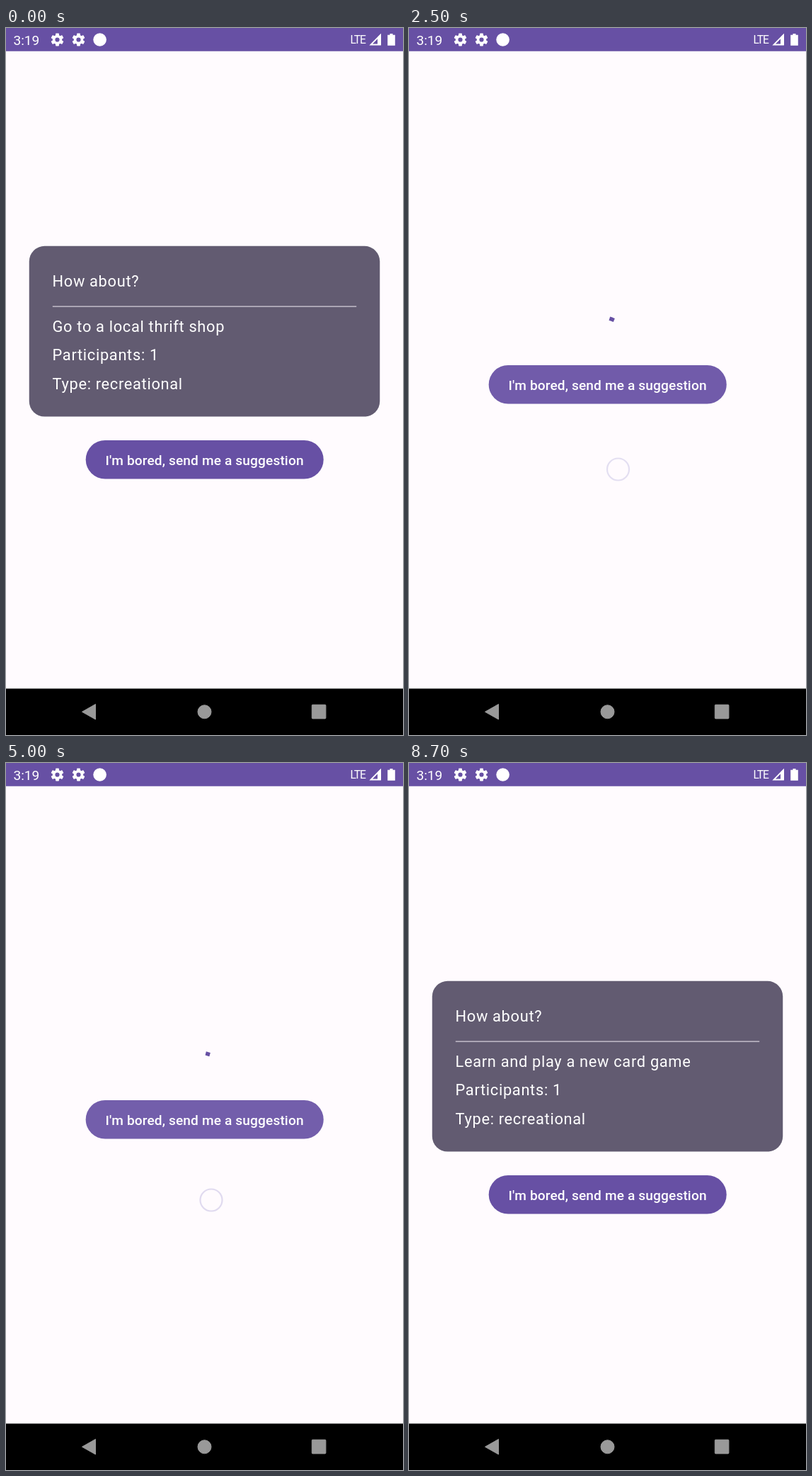
Recreate the animation shown at these times as an HTML page. Size 561x998 px, loop 8800 ms.

```html
<!DOCTYPE html>
<html lang="en">
<head>
<meta charset="utf-8">
<title>Suggestion app</title>
<style>
  html, body { margin: 0; width: 100%; height: 100%; overflow: hidden; background: #fffbfe; }
  svg { display: block; width: 100vw; height: 100vh; }
  text { font-family: Roboto, sans-serif; fill: #fff; }
  .body { font-size: 21.83px; letter-spacing: .68px; }
  .label { font-size: 19.1px; font-weight: 500; letter-spacing: .136px; text-anchor: middle; }
</style>
</head>
<body>
<svg viewBox="0 0 561 998">
  <defs>
    <g id="gear">
      <g fill="#fff">
        <circle r="6.7"/>
        <rect id="teeth" x="-2.4" y="-9" width="4.8" height="18" rx=".8"/>
        <use href="#teeth" transform="rotate(60)"/>
        <use href="#teeth" transform="rotate(120)"/>
      </g>
      <circle r="3.1" fill="#6750a4"/>
    </g>
    <clipPath id="pill"><rect x="112.7" y="582" width="336" height="54.6" rx="27.3"/></clipPath>
    <radialGradient id="glow">
      <stop offset=".7" stop-color="#fff" stop-opacity=".4"/>
      <stop offset="1" stop-color="#fff" stop-opacity="0"/>
    </radialGradient>
  </defs>

  <rect width="561" height="998" fill="#fffbfe"/>

  <!-- Status bar -->
  <rect width="561" height="32.75" fill="#6750a4"/>
  <text x="10.5" y="23.5" font-size="19.1">3:19</text>
  <use href="#gear" x="72.5" y="16.5"/>
  <use href="#gear" x="102.5" y="16.5"/>
  <circle cx="132.6" cy="16.5" r="9.3" fill="#fff"/>
  <text x="486.5" y="22" font-size="15.6" letter-spacing="-1.1">LTE</text>
  <path d="M515.5 23.5H529V10Z" fill="none" stroke="#fff" stroke-width="1.8"/>
  <path d="M525 24V13L530 8V24Z" fill="#fff"/>
  <path d="M542.5 8h4v1.7h3.3v15h-10.6v-15h3.3z" fill="#fff"/>

  <!-- Suggestion card -->
  <g id="card">
    <rect x="32.75" y="307.8" width="495.5" height="240.8" rx="21.8" fill="#625b71"/>
    <rect x="65.8" y="392.4" width="429.4" height="1.4" fill="#cac4d0"/>
    <g class="body">
      <text x="65.5" y="364.5">How about?</text>
      <text x="65.5" y="428.9" id="activity"></text>
      <text x="65.5" y="469.4">Participants: 1</text>
      <text x="65.5" y="510" id="type"></text>
    </g>
  </g>

  <circle id="spinner" cx="280.5" cy="427.8" r="17.75" pathLength="360" fill="none"
    stroke="#6750a4" stroke-width="5.46" stroke-linecap="square"/>

  <g id="button">
    <rect x="112.7" y="582" width="336" height="54.6" rx="27.3" fill="#6750a4"/>
    <g clip-path="url(#pill)"><circle id="ripple" fill="#fff"/></g>
    <text class="label" x="280.6" y="616.6">I'm bored, send me a suggestion</text>
  </g>

  <!-- Touch indicator -->
  <g id="touch">
    <circle r="19" fill="url(#glow)"/>
    <circle r="14.3" fill="#e4e0ea" fill-opacity=".66"/>
  </g>
  <circle id="ring" r="15.5" fill="none" stroke="#d3cdea" stroke-width="2.2"/>

  <!-- Navigation bar -->
  <rect y="932.5" width="561" height="65.5"/>
  <g fill="#999" stroke="#999" stroke-width="1" stroke-linejoin="round">
    <path d="M107.5 965.3L126.5 954.5V976Z"/>
    <circle cx="280.5" cy="965.3" r="9.5"/>
    <rect x="432.3" y="955.3" width="19.6" height="19.6" rx="1"/>
  </g>
</svg>
<script>
const LOOP = 8800, STEP = 100, SPIN = 1332;
const suggestions = [
  ["Go to a local thrift shop", "recreational"],
  ["Listen to your favorite album", "music"],
  ["Learn and play a new card game", "recreational"],
];
// Times in ms: finger down and up, then the loading phase
const taps = [
  { x: 295.5, y: 623, down: 2190, up: 2425, load: 2445, done: 3250 },
  { x: 290, y: 617, down: 4740, up: 4942, load: 4962, done: 5980 },
];

const $ = id => document.getElementById(id);
const set = (id, attrs) => {
  for (const [name, value] of Object.entries(attrs)) $(id).setAttribute(name, value);
};
const show = (id, visible) => set(id, { visibility: visible ? "visible" : "hidden" });
const clamp = v => Math.min(1, Math.max(0, v));

// cubic-bezier(.4, 0, .2, 1)
function ease(x) {
  let low = 0, high = 1;
  for (let i = 0; i < 20; i++) {
    const p = (low + high) / 2, q = 1 - p;
    if (1.2 * p * q * q + .6 * p * p * q + p ** 3 < x) low = p; else high = p;
  }
  return low * low * (3 - 2 * low);
}

function drawSpinner(t) {
  const local = t % SPIN, half = SPIN / 2;
  const head = 290 * ease(clamp(local / half));
  const tail = 290 * ease(clamp((local - half) / half));
  const base = Math.floor(t / SPIN) * 216 + 286 * local / SPIN;
  set("spinner", {
    "stroke-dasharray": `${Math.max(.1, head - tail)} 720`,
    transform: `rotate(${base + tail + 6 - 90} 280.5 427.8)`,
  });
}

function drawTap(t, tap) {
  const pressed = t >= tap.down && t < tap.up;
  const ringFade = 1 - (t - tap.up) / 200;
  show("touch", pressed);
  show("ring", t >= tap.up && ringFade > 0);
  set("touch", { transform: `translate(${tap.x} ${tap.y})` });
  set("ring", { cx: tap.x, cy: tap.y, opacity: clamp(ringFade) });
  const grow = ease(clamp((t - tap.down) / 225));
  set("ripple", {
    cx: tap.x + (280.6 - tap.x) * grow,
    cy: tap.y + (609.3 - tap.y) * grow,
    r: 100 + 90 * grow,
    opacity: .125 * clamp((t - tap.down) / 75) * clamp(1 - (t - tap.up) / 150),
  });
}

function draw(t) {
  const loading = taps.find(tap => t >= tap.load && t < tap.done);
  const [activity, type] = suggestions[taps.filter(tap => t >= tap.done).length];
  $("activity").textContent = activity;
  $("type").textContent = "Type: " + type;
  show("card", !loading);
  show("spinner", loading);
  if (loading) drawSpinner(t - loading.load);
  set("button", { transform: `translate(0 ${loading ? -106 : 0})` });
  drawTap(t, t < taps[0].done ? taps[0] : taps[1]);
}

function frame() {
  draw(Math.floor(performance.now() % LOOP / STEP) * STEP);
  requestAnimationFrame(frame);
}
frame();
</script>
</body>
</html>
```
